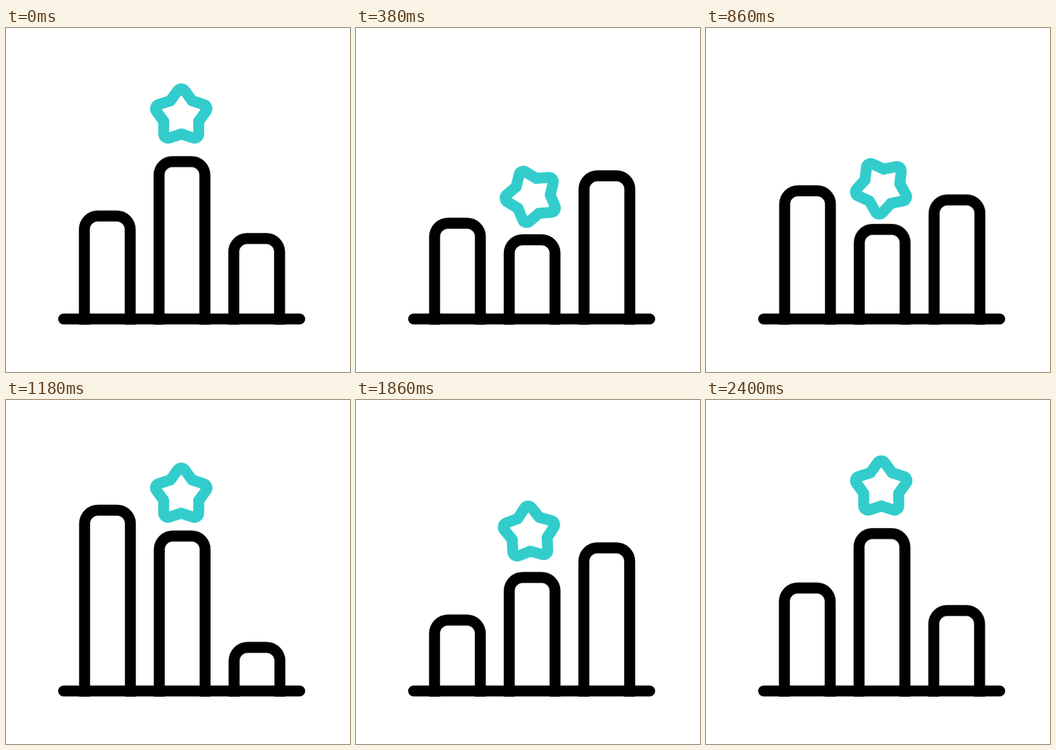
Write an HTML page without scripts that moves like this. It is 640x640 px and loops after 2620 ms.

```html
<!DOCTYPE html>
<html lang="en">
<head>
<meta charset="utf-8">
<title>Bars and star</title>
<style>
  html, body { margin: 0; width: 100%; height: 100%; overflow: hidden; background: #fff; }
  svg { display: block; width: 100%; height: 100%; }
  .lines { fill: none; stroke: #000; stroke-width: 20.4; stroke-linecap: round; stroke-linejoin: round; }
  .star { stroke: #33cccc; }
  .moving { animation: 2620ms cubic-bezier(.33333, 0, .66667, 1) infinite; }
  .left { animation-name: left; }
  .middle { animation-name: middle; }
  .right { animation-name: right; }
  .star { animation-name: star; }

  /* Four eased 600 ms moves, then a 220 ms rest */
  @keyframes left {
    0%, 91.603%, 100% { transform: translate(145.8px, 349.7px); }
    22.901% { transform: translate(146.4px, 369.1px); }
    45.802% { transform: translate(146.2px, 204.5px); }
    68.702% { transform: translate(146.1px, 411.2px); }
  }
  @keyframes middle {
    0%, 91.603%, 100% { transform: translate(284.7px, 248.5px); }
    22.901% { transform: translate(285.2px, 457px); }
    45.802% { transform: translate(285.2px, 252.5px); }
    68.702% { transform: translate(285.1px, 332.6px); }
  }
  @keyframes right {
    0%, 91.603%, 100% { transform: translate(423.7px, 391.6px); }
    22.901% { transform: translate(424.4px, 224.4px); }
    45.802% { transform: translate(424.4px, 461px); }
    68.702% { transform: translate(423.9px, 271.6px); }
  }
  @keyframes star {
    0%, 91.603%, 100% { transform: translate(326px, 163px) rotate(0deg); }
    22.901% { transform: translate(327.8px, 378.2px) rotate(71deg); }
    45.802% { transform: translate(326px, 175.8px) rotate(0deg); }
    68.702% { transform: translate(322.4px, 249.7px) rotate(71deg); }
  }
</style>
</head>
<body>
<svg viewBox="0 0 640 640">
  <defs>
    <clipPath id="ground"><path d="M0 0H640V551.6H0Z"/></clipPath>
    <path id="bar" d="M0 380V25a25 25 0 0 1 25-25h35.2a25 25 0 0 1 25 25V380"/>
    <path id="arm" d="M-20.1-27.7L-6.5-46.5A8 8 0 0 1 6.5-46.5L20.1-27.7"/>
  </defs>
  <g class="lines">
    <g clip-path="url(#ground)">
      <use href="#bar" class="moving left"/>
      <use href="#bar" class="moving middle"/>
      <use href="#bar" class="moving right"/>
    </g>
    <path d="M107.2 541.4H546.4"/>
    <g class="moving star">
      <use href="#arm"/>
      <use href="#arm" transform="rotate(72)"/>
      <use href="#arm" transform="rotate(144)"/>
      <use href="#arm" transform="rotate(216)"/>
      <use href="#arm" transform="rotate(288)"/>
    </g>
  </g>
</svg>
</body>
</html>
```
